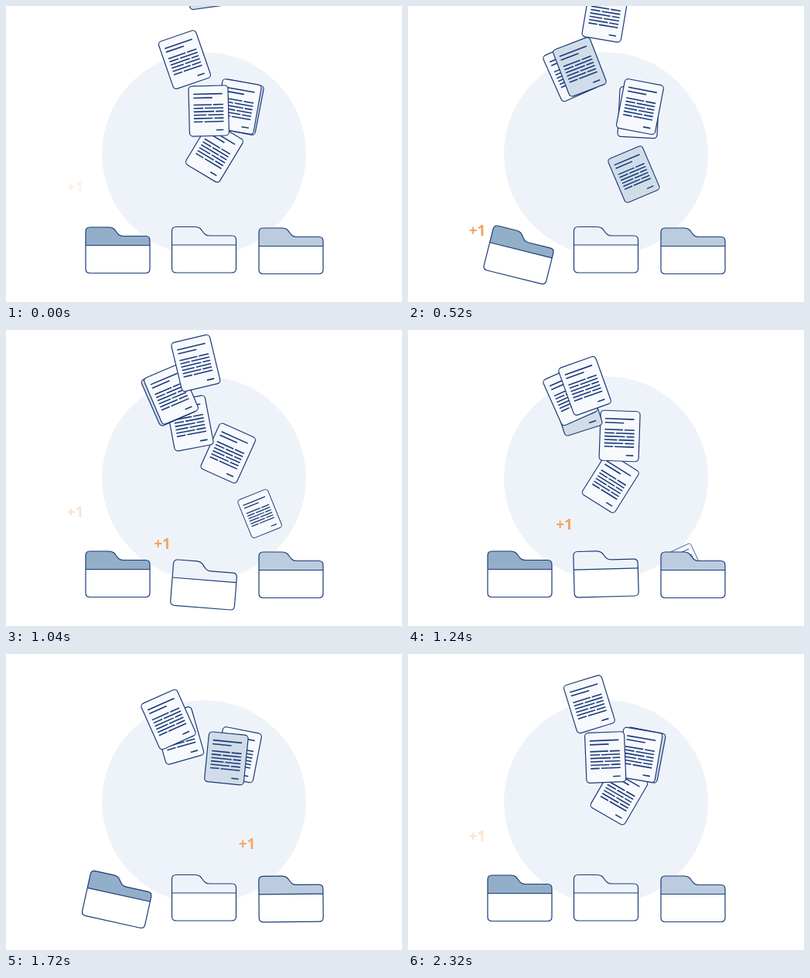
An HTML page with a canvas that plays this animation: 512x384 px, repeating every 2.36 s.

```html
<!DOCTYPE html>
<html lang="en">
<head>
<meta charset="utf-8">
<title>Sorting documents</title>
<style>
  html, body { margin: 0; width: 100%; height: 100%; overflow: hidden; background: #fff; }
  canvas { display: block; width: 512px; height: 384px; }
</style>
</head>
<body>
<canvas id="stage"></canvas>
<script>
const LOOP = 2360;
const NAVY = '#1b3a78', PALE = '#eef3fa', SHEET = '#f7f9fd', TINT = '#d0dde9', ORANGE = '#f2a460';

const canvas = document.getElementById('stage');
const ctx = canvas.getContext('2d');
const ratio = window.devicePixelRatio || 1;
canvas.width = 512 * ratio;
canvas.height = 384 * ratio;

// Keys: time, x, y, angle, scale
const ENTER = [
  [-60, 260, -54, -8, 1], [0, 259, -31, -8, 1], [30, 258, -19, -9, 1],
  [110, 255, 11, -10, 1], [280, 241, 53, -15, 1], [360, 234.5, 65, -17, 1],
  [400, 231, 69.5, -19, 1], [520, 222, 79, -21, 1], [720, 210, 85, -24, 1]
];
const CROSS = [
  [-520, 210, 85, -24, 1], [-400, 214, 93, -19, 1], [-315, 217, 98, -18, 1],
  [-100, 242, 125, -9, 1], [-40, 255, 134, -2.3, 1], [0, 262, 136, -1.5, 1],
  [70, 273.5, 137.5, 2, 1], [270, 292, 133, 8, 1], [400, 300, 130.5, 10, 1]
];
const FALLS = [
  [[-360, 299, 132, 13, 1], [-200, 291, 153, 22, 1], [-40, 273, 182, 30, 1],
   [0, 269.5, 189, 31, 1], [40, 262, 198, 32, .98], [240, 207, 260, 35, .78], [440, 146, 321, 20, .55]],
  [[200, 303, 132, 11, 1], [360, 301, 166, -10, .99], [520, 292, 218, -23, .95], [780, 256, 322, -15, .55]],
  [[400, 300, 131, 9, 1], [520, 298, 138, 3, 1], [680, 300, 159, -8, .98], [840, 306, 187, -18, .95],
   [1040, 328, 238, -22, .82], [1240, 359, 300, -25, .6], [1310, 368, 323, -20, .55]]
];

const shift = (keys, by) => keys.map(([t, ...rest]) => [t + by, ...rest]);

// Each sheet: entry, crossing and falling times, folder, fill, extra sway on entry
const docs = [
  [-400, 1170, 2360, 0, SHEET, 0],
  [0, 1540, 2360, 1, TINT, 0],
  [410, 1960, 2360, 2, SHEET, 24],
  [810, 2360, 3560, 0, SHEET, 0]
].map(([enter, cross, fall, folder, fill, sway]) => ({
  enter, fill, sway,
  keys: [...shift(ENTER, enter), ...shift(CROSS, cross), ...shift(FALLS[folder], fall)]
}));

const folders = [
  { x: 103, y: 287, fill: '#92aec8', textX: 89.5, hits: [400, 1640], pops: [480, 1760] },
  { x: 214.5, y: 286.5, fill: PALE, textX: 202, hits: [780], pops: [920] },
  { x: 327, y: 288, fill: '#baccde', textX: 311.5, hits: [1240], pops: [1330] }
];
// Keys: time, angle, drop
const BUMP = [
  [0, 0, 0], [60, 11, .5], [120, 14, 6], [200, 14.5, 17.5],
  [320, -5, 9], [440, -2.5, 0], [500, 0, 0]
];

const mod = t => ((t % LOOP) + LOOP) % LOOP;

// Monotone cubic through the keys
function sample(keys, t) {
  const last = keys.length - 1;
  if (t <= keys[0][0]) return keys[0].slice(1);
  if (t >= keys[last][0]) return keys[last].slice(1);
  let i = 0;
  while (t >= keys[i + 1][0]) i++;
  const slope = (k, c) => (keys[k + 1][c] - keys[k][c]) / (keys[k + 1][0] - keys[k][0]);
  const tangent = (k, c) => {
    if (k === 0 || k === last) return 0;
    const a = slope(k - 1, c), b = slope(k, c);
    return a * b <= 0 ? 0 : 2 * a * b / (a + b);
  };
  const span = keys[i + 1][0] - keys[i][0];
  const u = (t - keys[i][0]) / span, v = 1 - u;
  return keys[i].slice(1).map((p, n) => {
    const c = n + 1, q = keys[i + 1][c];
    return p * v * v * (1 + 2 * u) + q * u * u * (3 - 2 * u)
      + span * u * v * (v * tangent(i, c) - u * tangent(i + 1, c));
  });
}

function line(y, ...xs) {
  for (let i = 0; i < xs.length; i += 2) {
    ctx.moveTo(xs[i], y);
    ctx.lineTo(xs[i + 1], y);
  }
}

function drawDoc({ keys, enter, fill, sway }, t) {
  if (t < keys[0][0] || t >= keys[keys.length - 1][0]) return;
  const [x, y, angle, scale] = sample(keys, t);
  const extra = sway * Math.max(0, 1 - (t - enter) / 600);
  ctx.save();
  ctx.translate(x, y);
  ctx.rotate((angle + extra) * Math.PI / 180);
  ctx.scale(scale, scale);
  ctx.beginPath();
  ctx.roundRect(-25.5, -32.5, 51, 65, 4.5);
  ctx.fillStyle = fill;
  ctx.fill();
  ctx.lineWidth = 1.2;
  ctx.stroke();
  ctx.beginPath();
  line(-22, -19.5, 18);
  line(-17, -19.5, 5);
  for (let i = 0; i < 6; i++) {
    const gap = [4, -7, 7, -3, 5, -8][i];
    line(-8 + 4.4 * i, -19.5, gap, gap + 2, 19);
  }
  line(25, 9, 18.5);
  ctx.lineWidth = 1.6;
  ctx.stroke();
  ctx.restore();
}

function drawFolder({ x, y, fill, hits }, t) {
  const since = Math.min(...hits.map(h => mod(t - h)));
  const [angle, drop] = sample(BUMP, since);
  ctx.save();
  ctx.translate(x + 41.5, y + 29.5 + drop);
  ctx.rotate(angle * Math.PI / 180);
  ctx.translate(-41.5, -29.5);
  const body = new Path2D('M0 5.5Q0 0 5.5 0H30C41 0 38 11.5 49 11.5H77.5Q83 11.5 83 17V54Q83 59.5 77.5 59.5H5.5Q0 59.5 0 54Z');
  ctx.fillStyle = '#fff';
  ctx.fill(body);
  ctx.save();
  ctx.clip(body);
  ctx.fillStyle = fill;
  ctx.fillRect(-1, -1, 85, 24.5);
  ctx.restore();
  ctx.lineWidth = 1.2;
  ctx.stroke(body);
  ctx.beginPath();
  line(23.5, 0, 83);
  ctx.stroke();
  ctx.restore();
}

function drawPops({ textX, pops }, t) {
  for (const start of pops) {
    const age = mod(t - start);
    if (age > 680) continue;
    const rest = 1 - age / 680;
    ctx.globalAlpha = Math.min(1, age / 30, Math.max(0, (640 - age) / 260));
    ctx.fillText('+1', textX, 234 + 64 * rest * rest + 7);
  }
  ctx.globalAlpha = 1;
}

function draw(now) {
  const t = mod(now);
  ctx.setTransform(ratio, 0, 0, ratio, 0, 0);
  ctx.fillStyle = '#fff';
  ctx.fillRect(0, 0, 512, 384);
  ctx.fillStyle = PALE;
  ctx.beginPath();
  ctx.arc(256, 192, 132, 0, 2 * Math.PI);
  ctx.fill();

  ctx.strokeStyle = NAVY;
  ctx.lineCap = 'butt';
  // Earlier passes lie beneath later ones
  for (const pass of [2, 1, 0, -1]) {
    for (const doc of docs) drawDoc(doc, t + pass * LOOP);
  }
  for (const folder of folders) drawFolder(folder, t);

  ctx.fillStyle = ORANGE;
  ctx.font = '700 19px "Open Sans", sans-serif';
  ctx.textAlign = 'center';
  for (const folder of folders) drawPops(folder, t);
}

const begin = performance.now();
function tick() {
  draw(performance.now() - begin);
  requestAnimationFrame(tick);
}
tick();
</script>
</body>
</html>
```
